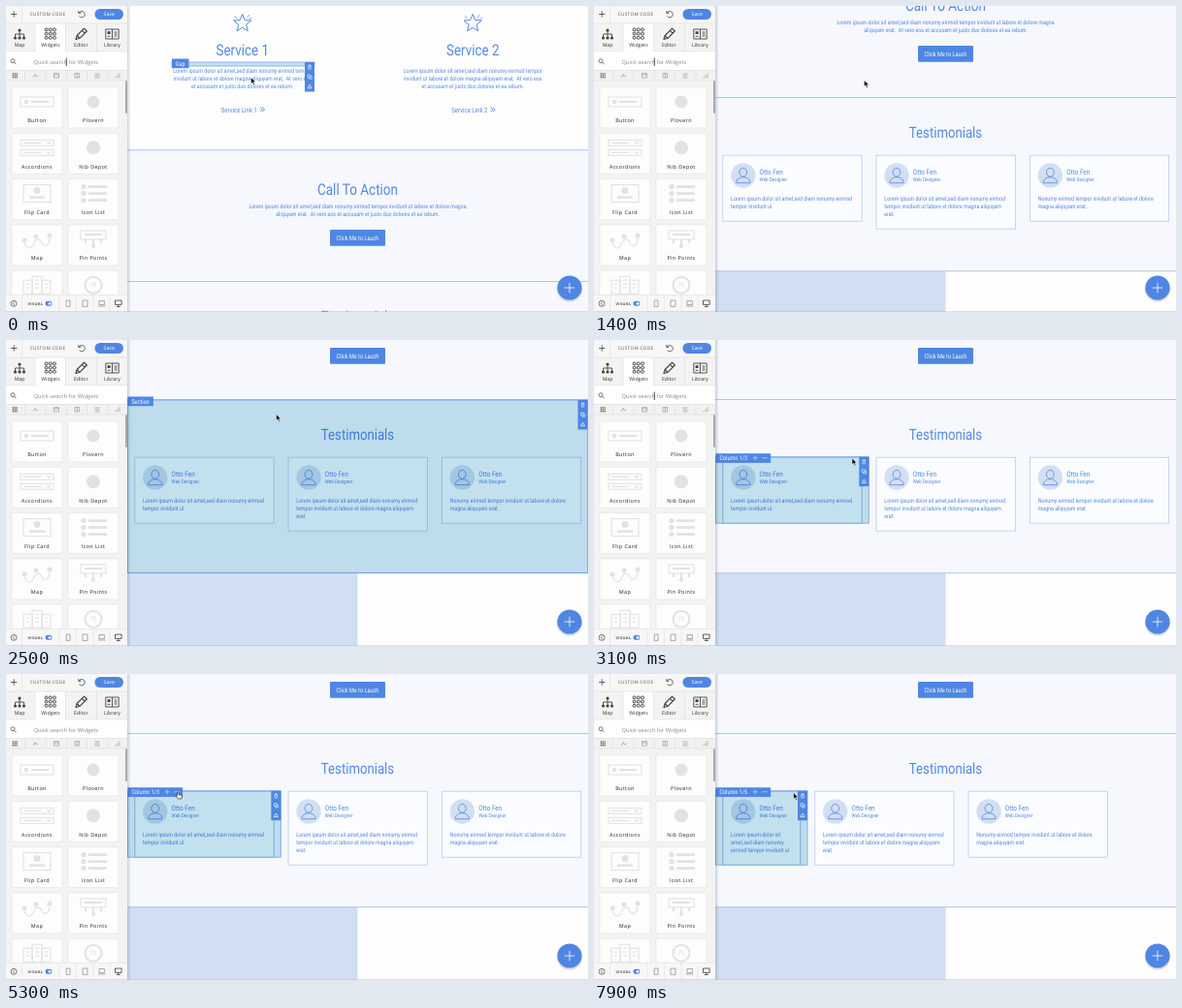
These frames come from a looping animation (600 by 316 pixels, 8 s). An HTML page:

```html
<!DOCTYPE html>
<html lang="en">
<head>
<meta charset="utf-8">
<title>Page builder</title>
<style>
html, body { margin: 0; width: 100%; height: 100%; overflow: hidden; background: #fff }
svg { display: block; width: 100vw; height: 100vh }
text { text-rendering: geometricPrecision; white-space: pre }
.page { font-family: Roboto, "Liberation Sans", sans-serif }
.side { font-family: "Open Sans", "Noto Sans", sans-serif }
.tint { mix-blend-mode: multiply }
</style>
</head>
<body>
<svg viewBox="0 0 600 316">
  <defs>
    <linearGradient id="shade"><stop stop-color="#234" stop-opacity=".2"/><stop offset="1" stop-color="#234" stop-opacity="0"/></linearGradient>
    <clipPath id="list"><rect y="77" width="125" height="221"/></clipPath>
  </defs>
  <g id="page" class="page"></g>
  <g id="side" class="side"></g>
  <rect id="caret" x="61.8" y="53.5" width=".8" height="8.5" fill="#222"/>
  <g id="cursor"></g>
</svg>
<script>
const BLUE = '#4f86e3', TEXT = '#5389e5', PALE = '#d2dff2', NARROW = .84;
const $ = id => document.getElementById(id);

const rect = (x, y, w, h, fill, more = '') =>
  `<rect x="${x}" y="${y}" width="${w}" height="${h}" fill="${fill}" ${more}/>`;
const circle = (x, y, r, fill, more = '') => `<circle cx="${x}" cy="${y}" r="${r}" fill="${fill}" ${more}/>`;
const line = (d, color, w = 1, more = '') =>
  `<path d="${d}" fill="none" stroke="${color}" stroke-width="${w}" ${more}/>`;
const at = (x, y, body) => `<g transform="translate(${x} ${y})">${body}</g>`;

// Condensed page text
const type = (x, y, size, str, { fill = TEXT, anchor = 'start' } = {}) =>
  `<text transform="translate(${x} ${y}) scale(${NARROW} 1)" font-size="${size}" fill="${fill}" text-anchor="${anchor}">${str}</text>`;
const MID = { anchor: 'middle' };
const lines = (x, y, rows, opt) => rows.map((s, i) => type(x, y + i * 8, 6.28, s, opt)).join('');
// Sidebar text
const label = (x, y, size, str, fill = '#333', weight = 400, gap = 0, anchor = 'middle') =>
  `<text x="${x}" y="${y}" font-size="${size}" fill="${fill}" font-weight="${weight}" letter-spacing="${gap}" text-anchor="${anchor}">${str}</text>`;

const LOREM = 'Lorem ipsum dolor sit amet,sed diam nonumy eirmod';
const FIRST = {
  3: [LOREM, 'tempor invidunt ul.'],
  4: ['Lorem ipsum dolor sit amet,sed', 'diam nonumy eirmod tempor', 'invidunt ul.'],
  5: ['Lorem ipsum dolor sit', 'amet,sed diam nonumy', 'eirmod tempor invidunt ul.']
};

function star(x, y) {
  let d = '';
  for (let i = 0; i < 10; i++) {
    const a = i * Math.PI / 5, r = i % 2 ? 4.2 : 9.6;
    d += `${i ? 'L' : 'M'}${(r * Math.sin(a)).toFixed(1)} ${(-r * Math.cos(a)).toFixed(1)}`;
  }
  return at(x, y, line(d + 'Z', BLUE, 1, 'stroke-linejoin="round"') +
    line('M5-6L7-9M7-4L10-6M-6-5L-8-8', BLUE, .7));
}

function service(x, n) {
  return star(x, -205) + type(x, -172.5, 16, 'Service ' + n, MID) +
    lines(x, -153.8, [LOREM + ' tempor', 'invidunt ut labore et dolore magna aliquyam erat,  At vero eos',
      'et accusam et justo duo dolores et ea rebum.'], MID) +
    type(x - 22, -113.5, 7.2, `Service Link ${n}`) +
    line(`M${x + 18.5}-118.5l2 2.3-2 2.3m2.3-4.6l2 2.3-2 2.3`, BLUE, .9);
}

function card(x, w, rows) {
  const h = rows.length > 2 ? 76 : 68;
  return rect(x, 121.2, w, h, '#fbfcff', 'stroke="#b6cbf1" stroke-width=".8"') +
    circle(x + 21, 142, 12.7, PALE) +
    `<ellipse cx="${x + 21}" cy="138.8" rx="3.9" ry="4.4" fill="none" stroke="${BLUE}" stroke-width=".8"/>` +
    line(`M${x + 13.8} 149.7c0-8 14.4-8 14.4 0z`, BLUE, .8, 'stroke-linejoin="round"') +
    type(x + 37.8, 141, 7.6, 'Otto Fen') + type(x + 37.8, 148.3, 5.5, 'Web Designer') +
    lines(x + 8.3, 167.7, rows);
}

// Hovered block: tint, outline, toolbar and name tag
function hover(x, y, w, h, name, tagW, buttons = '') {
  const icon = line('M-1.6-1.6h3.2M-1.2-.9h2.4v3h-2.4zM-.5-2.2h1', '#fff', .6);
  const copy = line('M-2-2h2.8v2.8h-2.8zM-.6 1v1.2h2.8v-2.8h-1.2', '#fff', .6);
  const alert = line('M0-1.8L2 1.8h-4z', '#fff', .7);
  return rect(x, y, w, h, '#c6e3ee', 'class="tint"') +
    rect(x, y, w, h, 'none', `stroke="${BLUE}" stroke-width=".8" stroke-opacity=".75"`) +
    rect(x + w - 10, y, 10, 30.5, BLUE) +
    [icon, copy, alert].map((s, i) => at(x + w - 5, y + 5 + i * 10, s)).join('') +
    rect(x, y - 3.5, tagW, 9.7, BLUE) +
    type(x + (buttons ? 4 : tagW / 2), y + 3.6, 6.5, name, { fill: '#fff', anchor: buttons ? 'start' : 'middle' }) + buttons;
}

function column(n) {
  const w = 475 / n, h = n > 3 ? 76.5 : 68.5;
  return hover(125.4, 120.7, w - .4, h, 'Column 1/' + n, 56.8,
    line('M163.7 121.7h5M166.2 119.2v5M173.2 121.7h5.6', '#b9d0f7', .8)) +
    line(`M132.8 126.5v${h - 6}M${118 + w} 151v${h - 31}`, BLUE, .5, 'opacity=".6"');
}

function overlay(t, n) {
  if (t < 100) return hover(171, -165, 147, 4, 'Gap', 17.5);
  if (t < 1900) return '';
  if (t < 2200) return column(3);
  if (t < 2400) return '';
  if (t < 2900) return hover(125.4, 62, 474.2, 178.3, 'Section', 26.5);
  if (t < 3500) return column(3);
  if (t < 4300) return hover(141.7, 129, 126, 26, 'People', 24.5);
  return column(n);
}

function page(t) {
  const n = t < 6000 ? 3 : t < 6700 ? 4 : 5, x = 125 + 475 / n, third = 475 / 3;
  return rect(125, -300, 475, 226, '#fefeff') + rect(125, -74, 475, 315, '#f6f8fd') +
    rect(125, 241, 475, 200, '#fefeff') + rect(125, 241, 237.5, 200, PALE) +
    line('M125-74.2h475M125 61.5h475M125 240.7h475', '#a6c0ec', .9) +
    service(243.7, 1) + service(481.2, 2) +
    type(362.5, -28.4, 16.1, 'Call To Action', MID) +
    lines(362.5, -14.3, [LOREM + ' tempor invidunt ut labore et dolore magna',
      'aliquyam erat.  At vero eos et accusam et justo duo dolores et ea rebum.'], MID) +
    rect(334, 8, 57, 16.7, BLUE, 'rx="1"') + type(362.5, 18.8, 6.6, 'Click Me to Lauch', { fill: '#fff', ...MID }) +
    type(362.5, 102.5, 15.7, 'Testimonials', MID) +
    card(132.8, 475 / n - 15, FIRST[n]) +
    card(x + 7.7, third - 15, [LOREM, 'tempor invidunt ut labore et dolore magna aliquyam', 'erat.']) +
    card(x + third + 7.7, third - 15, ['Nonumy eirmod tempor invidunt ut labore et dolore', 'magna aliquyam erat.']) +
    rect(220.5, 337.3, 47, 40, 'none', `rx="2.5" stroke="${BLUE}" stroke-width="3"`) +
    circle(232, 347.5, 3.8, 'none', `stroke="${BLUE}" stroke-width="2.2"`) +
    line('M224 370l12-13 7 6 10-17 12 16', BLUE, 2.4) +
    type(385.7, 322, 5.9, 'Short Description') + type(385.7, 343, 16.3, 'Wireframe Title') +
    lines(385.7, 356, [LOREM + ' tempor invidunt ut', 'labore et dolore magna aliquyam erat.  At vero eos et accusam et justo']) +
    overlay(t, n);
}

function sidebar() {
  const G = '#e2e2e2', D = '#444', M = '#999';
  const grid = (x, y, s, step, color, w) => [0, 1, 2].map(r => [0, 1, 2].map(c =>
    rect(x + c * step, y + r * step, s, s, w ? 'none' : color, w ? `rx=".8" stroke="${color}" stroke-width="${w}"` : '')).join('')).join('');
  const box = (x, y, w, h) => rect(x, y, w, h, 'none', `stroke="${G}" stroke-width="1.1"`);
  const art = [
    box(-17, -5, 34, 10) + rect(-13, -2, 4, 4, G) + line('M-6 0h18', G, 2),
    circle(0, 0, 6.5, G),
    box(-17, -8, 34, 6) + box(-17, 2, 34, 6) + line('M-14-5h18M-14 5h18M10-6l2 2 2-2M10 4l2 2 2-2', G, 1.3),
    circle(0, 0, 7, G),
    box(-14, -9, 28, 18) + circle(0, -3, 3.5, G) + line('M-8 4h16', G, 2.5),
    [-7, 0, 7].map(y => circle(-10, y, 2.7, G) + line(`M-4 ${y}h17`, G, 2.6, 'stroke-linecap="round"')).join(''),
    line('M-13 4c3 8 8 5 10 0s6-5 8 0 8 2 8-5', G, 1.2) + circle(-13, 1, 2.5, G) + circle(-1, -3, 2.5, G) + circle(13, -4, 2.5, G),
    box(-13, -9, 26, 9) + line('M-9-5h18M0 0v6M-8 0v4M8 0v4', G, 2) + circle(0, 7, 2, G),
    box(-14, -5, 9, 14) + box(-5, -9, 10, 18) + box(5, -5, 9, 14) + line('M-11-1h3m-3 4h3M-2-5h4m-4 4h4m-4 4h4M8-1h3m-3 4h3', G, 1.3),
    circle(0, 0, 8.5, 'none', `stroke="${G}" stroke-width="2"`) + label(0, 2.2, 6, '75', '#d5d5d5')
  ];
  const names = ['Button', 'Plovern', 'Accordions', 'Nib Depot', 'Flip Card', 'Icon List', 'Map', 'Pin Points', '', ''];
  const widgets = names.map((name, i) => {
    const x = 6 + i % 2 * 58, y = 84 + (i >> 1) * 47.3;
    return rect(x, y, 52, 42, '#fdfdfd', 'rx="1" stroke="#e4e4e4" stroke-width=".7"') +
      at(x + 26, y + 15, art[i]) + label(x + 26, y + 36.2, 5.4, name, '#222', 500, .42);
  }).join('');
  const tabs = ['Map', 'Widgets', 'Editor', 'Library'].map((s, i) => label([14, 46, 77.3, 109.5][i], 42, 5.2, s, '#333', 500)).join('');

  return rect(125, 0, 4, 316, 'url(#shade)') + rect(0, 0, 125, 316, '#f3f3f3') +
    // Header
    rect(0, 0, 125, 18, '#f7f7f7') + line('M5 8.5h6.4M8.2 5.3v6.4', D, .8) + line('M16.5 0v18', '#e4e4e4', .7) +
    label(43, 10.3, 4.7, 'CUSTOM CODE', '#555', 400, .33) +
    line('M75.2 7.2a3.2 3.2 0 1 1 .3 3.4M74.6 4.9l.4 2.8 2.6-.6', D, .8) +
    rect(91.5, 3, 29.5, 11, BLUE, 'rx="5.5"') + label(106.2, 10.4, 5.2, 'Save', '#fff') +
    // Tabs
    rect(0, 18, 125, 29, '#f3f3f3') + rect(30, 18, 31.5, 29.5, '#fff') +
    line('M0 18h125M30 18v29M61.5 18v29M93.5 18v29M0 47h30M61.5 47h63.5', '#dedede', .7) + tabs +
    line('M14 26v3M9.5 32v-3h9v3M14 29v3', D, .9) + [[14, 25], [9.5, 33], [14, 33], [18.5, 33]].map(p => circle(...p, 1.6, D)).join('') +
    grid(40.2, 23, 2.7, 4.2, D, 1) +
    line('M72 34.5l1.2-4 7.3-7.3 2.8 2.8-7.3 7.3zM78.4 25.3l2.8 2.8M73.2 30.5l2.8 2.8', D, 1.2, 'stroke-linejoin="round"') +
    line('M102.8 24h13.4v10h-13.4zM109.5 24v10M111.5 27h3M111.5 29h3M111.5 31h3', D, .9) + rect(104.6, 26.2, 3, 2.8, D) + line('M104.6 31.3h3', D, .9) +
    // Search
    rect(0, 47.4, 125, 19, '#fff') + circle(7, 56.7, 2, 'none', `stroke="${D}" stroke-width=".7"`) + line('M8.5 58.2l2 2', D, .8) +
    label(28.6, 59.7, 5.75, 'Quick search for Widgets', '#888', 400, 0, 'start') +
    // Filters
    rect(0, 66.5, 125, 10.5, '#f1f1f1') + line('M0 66.5h125M0 77h125M19.5 66.5v10.5M41 66.5v10.5M62.5 66.5v10.5M83.5 66.5v10.5M105 66.5v10.5', '#dfdfdf', .7) +
    grid(6.7, 69.3, 1.2, 1.9, D) +
    line('M28 74l2-3.5 1.6 2.5 1.5-1M49.5 69.6h5v4.4h-5zM49.5 71h5M71 69.6h4.6v4.4h-4.6zM73.3 69.6v4.4M91.5 70h5M91.5 72h5M91.5 74h5M113 74.3v-1.5M115 74.3v-3M117 74.3v-5', M, .7) +
    `<g clip-path="url(#list)">${widgets}</g>` + rect(123, 77, 2, 34, '#aaa', 'rx="1"') +
    // Footer
    rect(0, 298, 125, 18, '#f7f7f7') + line('M0 298.3h125M16.5 298v18M55 298v18M72.5 298v18M90 298v18M107 298v18', '#e2e2e2', .7) +
    circle(8, 307.3, 3, 'none', `stroke="${D}" stroke-width=".7"`) + line('M8.8 305.6l-1.7 1.7 1.7 1.7', D, .7) +
    label(22.5, 308.9, 4, 'VISUAL', '#333', 600, .38, 'start') +
    rect(40.5, 304.8, 6.8, 5, BLUE, 'rx="2.3"') + circle(45, 307.3, 1.4, '#fff') +
    line('M62.2 304h3.8v6.4h-3.8zM79 304h5v6.4h-5zM96 304.5h5.4v4h-5.4zM94.8 310h7.8', '#777', .6) +
    line('M112.5 304h6.6v4.4h-6.6zM115.8 308.4v2M113.8 310.5h4', '#222', .7) +
    // Frame edge and add button
    rect(0, 315.2, 600, .8, '#bbb', 'opacity=".6"') +
    circle(581, 292.3, 13.3, '#234', 'opacity=".15"') + circle(581, 291, 12.6, BLUE) + line('M575.8 291h10.4M581 285.8v10.4', '#fff', .8);
}

const ARROW = '<path d="M0 0v6.8l1.6-1.5 1.1 2.6 1.2-.5-1.1-2.5h2.2z" fill="#111" stroke="#fff" stroke-width=".5"/>';
const HAND = '<path d="M-1.5-2.8q.8-1 1.5 0v2.3l2.7.6q1 .4.7 1.8l-.6 2h-3.4l-2.4-3.2q.2-1 1.5 0z" fill="#fff" stroke="#222" stroke-width=".7"/>';

const SCROLL = [[0, 223], [1000, 98], [1900, -48], [2100, -48], [2200, -25], [2300, -25], [2400, 0]];
const MOUSE_X = [[0, 252.5], [900, 278.5], [2800, 278.5], [3100, 266], [3700, 185], [4200, 138.7], [4600, 138.7], [5300, 178], [7500, 178], [7900, 205.6]];
const MOUSE_Y = [[0, 73.7], [900, 76.5], [2800, 76.5], [3100, 122], [3700, 142], [4200, 135], [4600, 135], [5300, 125], [7500, 125], [7900, 122.5]];
const CARET = [[0, 500], [1000, 1500], [1900, 2400], [2900, 3400], [3900, 4100], [4600, 5100], [5800, 6000]];

function track(points, t) {
  const i = points.findIndex(p => p[0] > t);
  if (i < 0) return points.at(-1)[1];
  const [t0, a] = points[i - 1], [t1, b] = points[i];
  return a + (b - a) * (t - t0) / (t1 - t0);
}

let shown = -1;
function draw(now) {
  const t = Math.floor(now % 8000 / 100) * 100;
  if (t === shown) return;
  shown = t;
  $('page').setAttribute('transform', `translate(0 ${Math.round(track(SCROLL, t))})`);
  $('page').innerHTML = page(t);
  $('caret').style.display = CARET.some(([a, b]) => t >= a && t < b) ? '' : 'none';
  const onTool = t >= 1900 && t < 2200, onTag = t >= 5200 && t < 7600;
  $('cursor').innerHTML = at(track(MOUSE_X, t) + (onTool ? 1 : 0), track(MOUSE_Y, t) + (onTool ? 3 : 0), onTool || onTag ? HAND : ARROW);
}

$('side').innerHTML = sidebar();
const start = performance.now();
(function loop() {
  draw(performance.now() - start);
  requestAnimationFrame(loop);
})();
</script>
</body>
</html>
```
